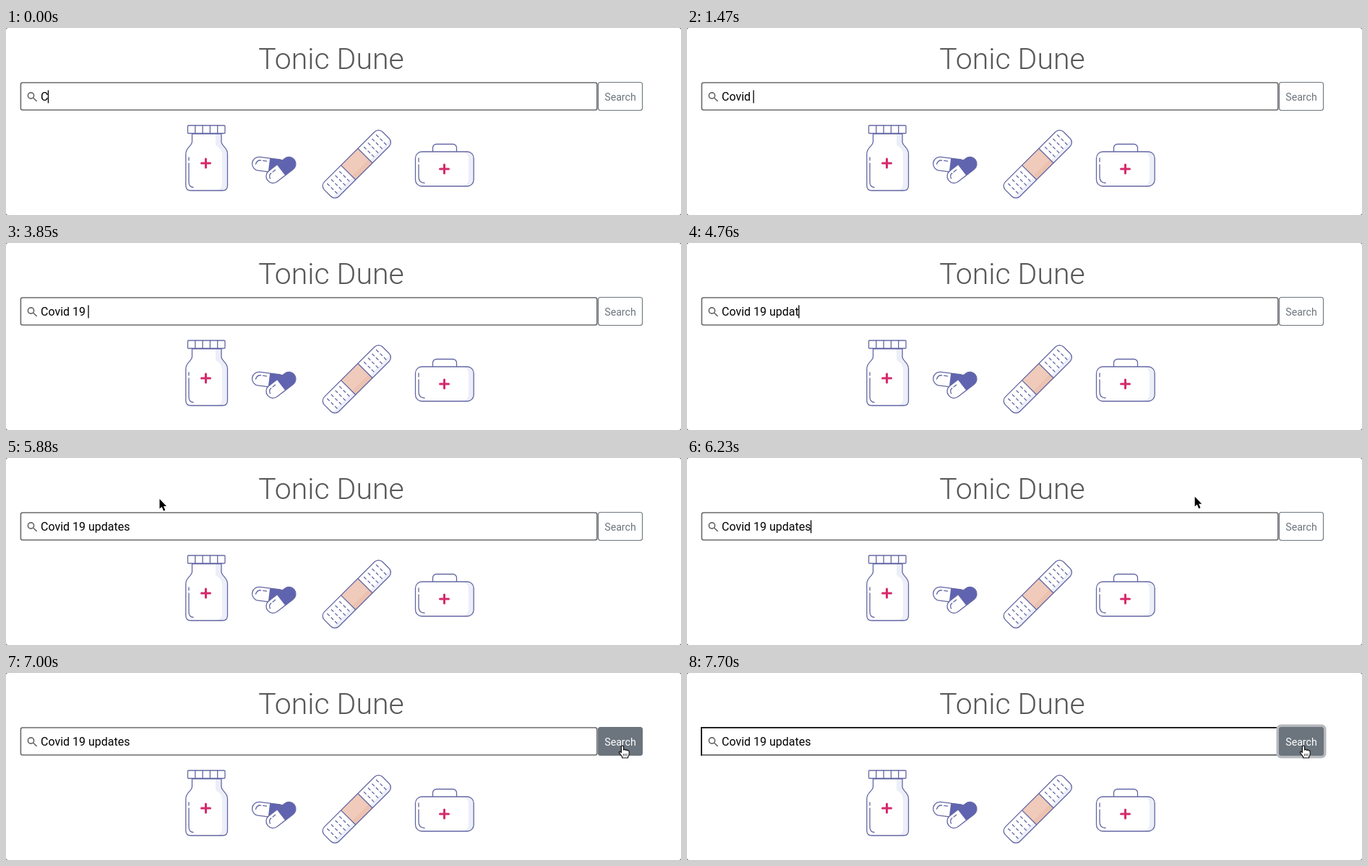
Animation of 934 by 260 pixels, one loop 8820 ms. Source, as an HTML page with a canvas:

```html
<!DOCTYPE html>
<html lang="en">
<head>
<meta charset="utf-8">
<title>Health search</title>
<style>
  html, body { margin: 0; width: 100%; height: 100%; overflow: hidden; background: #fff; }
  canvas { display: block; width: 934px; height: 260px; }
</style>
</head>
<body>
<canvas id="stage"></canvas>
<script>
const W = 934, H = 260, LOOP = 8820, STEP = 70;
const INK = '#6467a4', BLUE = '#6064b0', SHADE = '#eceef8', PINK = '#d62a6c';
const GREY = [108, 117, 125], WHITE = [255, 255, 255];
const QUERY = 'Covid 19 updates';
const KEY_TIMES = [0, 140, 280, 840, 980, 1470, 1850, 2520, 2800, 3990, 4270, 4410, 4620, 4760, 4900, 5180];
const BLINK = 525, HOVER = 6390, CLICK = 7190, FADE = 150;
// time, x, y of the pointer tip
const PATH = [[5740, 96, 95], [5880, 212, 57], [6090, 470, 24], [6300, 800, 72], [6440, 853, 95], [6580, 853, 101]];

const canvas = document.getElementById('stage');
const ctx = canvas.getContext('2d');
const dpr = window.devicePixelRatio || 1;
canvas.width = W * dpr;
canvas.height = H * dpr;

const clamp = v => Math.max(0, Math.min(1, v));
const mix = (a, b, p) => `rgb(${a.map((v, i) => Math.round(v + (b[i] - v) * p))})`;

// CSS "ease": cubic-bezier(.25, .1, .25, 1)
function ease(x) {
  if (x <= 0 || x >= 1) return clamp(x);
  let lo = 0, hi = 1;
  for (let i = 0; i < 20; i++) {
    const s = (lo + hi) / 2, r = 1 - s;
    if (.75 * r * r * s + .75 * r * s * s + s ** 3 < x) lo = s; else hi = s;
  }
  const r = 1 - lo;
  return .3 * r * r * lo + 3 * r * lo * lo + lo ** 3;
}

function pointerAt(t) {
  const last = PATH.length - 1;
  if (t >= PATH[last][0]) return PATH[last].slice(1);
  const i = PATH.findIndex((p, k) => t < PATH[k + 1][0]);
  const a = PATH[i], b = PATH[i + 1], span = b[0] - a[0], u = (t - a[0]) / span;
  const slope = (k, axis) => {
    const p = PATH[Math.max(0, k - 1)], q = PATH[Math.min(last, k + 1)];
    return k === last ? 0 : (q[axis] - p[axis]) / (q[0] - p[0]) * span;
  };
  return [1, 2].map(axis =>
    a[axis] * (2 * u ** 3 - 3 * u * u + 1) + b[axis] * (3 * u * u - 2 * u ** 3) +
    slope(i, axis) * (u ** 3 - 2 * u * u + u) + slope(i + 1, axis) * (u ** 3 - u * u));
}

function paint(path, fill, stroke, width = 1.3) {
  if (fill) { ctx.fillStyle = fill; ctx.fill(path); }
  if (stroke) { ctx.strokeStyle = stroke; ctx.lineWidth = width; ctx.stroke(path); }
}

function box(x, y, w, h, r) {
  const p = new Path2D();
  p.roundRect(x, y, w, h, r);
  return p;
}

const line = (d, color = INK, width = 1.3) => paint(new Path2D(d), null, color, width);

function within(path, draw) {
  ctx.save();
  ctx.clip(path);
  draw();
  ctx.restore();
}

function turned(x, y, degrees, draw) {
  ctx.save();
  ctx.translate(x, y);
  ctx.rotate(degrees * Math.PI / 180);
  draw();
  ctx.restore();
}

function label(text, x, y, font, color, align = 'left') {
  ctx.font = `${font} Roboto, sans-serif`;
  ctx.textAlign = align;
  ctx.fillStyle = color;
  ctx.fillText(text, x, y);
}

const plus = (x, y) => line(`M${x - 6} ${y}h12M${x} ${y - 6}v12`, PINK, 3);

function bottle() {
  const body = new Path2D('M257.5 147V158C257.5 164 248.8 166 248.8 175V219Q248.8 226 255.8 226H299.5Q306.5 226 306.5 219V175C306.5 166 298 164 298 158V147Z');
  paint(body, '#fff');
  within(body, () => paint(new Path2D('M290 147V163Q299 168 299 176V216Q299 224 291 226H308V147Z'), SHADE));
  paint(body, null, INK);
  paint(box(251.5, 135.5, 51.5, 11, 1), '#fff', INK);
  line('M261.8 135.5v11M272.1 135.5v11M282.4 135.5v11M292.7 135.5v11');
  line('M253 180V184M253 188V214Q253 221 259 221.5');
  plus(276.5, 188);
}

function capsule(x, y, degrees, half, mark) {
  turned(x, y, degrees, () => {
    const shell = box(-half, -9.5, half * 2, 19, 9.5);
    paint(shell, '#fff');
    within(shell, () => paint(box(0, -10, half, 20, 0), BLUE));
    paint(shell, null, INK);
    line(mark);
  });
}

function pills() {
  capsule(364, 190.5, 7, 23.5, 'M-18.5 1Q-17.5 -5 -12 -5M-9 -5H-4');
  capsule(380.5, 197.5, -38, 23.5, 'M-19 0Q-18 -5 -13.5 -5M-10.5 -5H-6');
}

function bandage() {
  turned(485.3, 189.3, -45, () => {
    const strip = box(-57, -14.3, 114, 28.6, 8);
    paint(strip, '#fff');
    within(strip, () => {
      paint(box(-58, 9, 116, 6, 0), SHADE);
      paint(box(-16.5, -15, 33, 30, 0), '#f0cbbb');
      paint(box(-16.5, 7, 33, 8, 0), '#ecc2b0');
    });
    paint(strip, null, INK);
    line('M-16.5 -14.3v28.6M16.5 -14.3v28.6');
    ctx.setLineDash([4.8, 2.8]);
    for (const side of [-1, 1])
      for (let u = 24; u <= 48; u += 8) line(`M${side * u} -10v20`);
    ctx.setLineDash([]);
  });
}

function kit() {
  paint(box(590.5, 161.5, 33, 18, 5), '#fff', INK);
  const body = box(566.5, 172, 80.7, 48, 9);
  paint(body, '#fff');
  within(body, () => paint(new Path2D('M630 172Q640 173 640 182V210Q640 219 630 220H649V172Z'), SHADE));
  paint(body, null, INK);
  line('M571 181V186M571 190V207Q571 215 579 215.5');
  plus(606.5, 196);
}

function searchField(t) {
  if (t < CLICK) {
    paint(box(20.4, 76, 797.4, 38, 2.5), '#fff', '#6b6b6b', 1.6);
  } else {
    paint(box(19, 75, 799, 40, 0), '#fff');
    line('M19 114H818M817 75V115', '#767676', 2);
    line('M20 115V76H818', '#222', 2);
  }
  line('M38.6 94a4.1 4.1 0 1 1 -8.2 0a4.1 4.1 0 1 1 8.2 0M37.5 97L42.6 101.8', '#6a6a6a', 1.7);

  const typed = KEY_TIMES.filter(k => k <= t);
  const text = QUERY.slice(0, typed.length);
  label(text, 48, 101, '16px', '#000');
  const idle = t - typed[typed.length - 1];
  if (t < CLICK && Math.floor(idle / BLINK) % 2 === 0) {
    ctx.fillRect(47.4 + ctx.measureText(text).width, 86.5, 1.3, 18);
  }
}

function searchButton(t) {
  const hover = ease(clamp((t - HOVER) / FADE));
  const focus = ease(clamp((t - CLICK) / FADE));
  if (focus > 0) {
    const g = 3.5 * focus;
    const ring = box(819 - g, 75 - g, 62 + 2 * g, 40 + 2 * g, 3 + g);
    paint(ring, '#fff');
    paint(ring, `rgba(${GREY},${.5 * focus})`);
  }
  paint(box(819.5, 75.5, 61, 39, 3), mix(WHITE, GREY, hover), `rgb(${GREY})`, 1.1);
  label('Search', 850, 100.5, '14.2px', mix(GREY, WHITE, hover), 'center');
}

function pointer(t) {
  if (t < PATH[0][0]) return;
  const [x, y] = pointerAt(t);
  ctx.save();
  ctx.translate(x, y);
  ctx.lineJoin = 'round';
  if (t < PATH[0][0] + STEP) {
    line('M-3 -8Q0 -8 0 -6Q0 -8 3 -8M0 -6V6M-3 8Q0 8 0 6Q0 8 3 8', '#000', 1.1);
  } else if (x > 819 && y > 75) {
    paint(new Path2D('M-1.6 1.2Q0 -1 1.6 1.2V6Q3.5 4.5 4.6 6.4Q6.3 5.2 7.2 7Q9 6.2 9.2 8.4V11.5Q9 14 7.6 15.4V17H-.4V15.4Q-2.5 13 -4.6 9.6Q-4.8 7.4 -1.6 9.4Z'), '#fff', '#111', 1.2);
    line('M1.6 11.2v3.2M3.8 11.2v3.2M6 11.2v3.2', '#111', .8);
  } else {
    const arrow = new Path2D('M.5 0V13.6L3.6 10.8L6 16.4L8.3 15.4L6 10H10Z');
    paint(arrow, null, '#fff', 2.2);
    paint(arrow, '#000');
  }
  ctx.restore();
}

function draw(t) {
  ctx.setTransform(dpr, 0, 0, dpr, 0, 0);
  ctx.fillStyle = '#555';
  ctx.fillRect(0, 0, W, H);
  paint(box(0, 0, W, H, 3), '#fff');
  label('Tonic Dune', 450, 56.5, '350 41px', '#58585a', 'center');
  ctx.lineCap = 'round';
  bottle();
  pills();
  ctx.lineCap = 'butt';
  bandage();
  ctx.lineCap = 'round';
  kit();
  ctx.lineCap = 'butt';
  searchField(t);
  searchButton(t);
  pointer(t);
}

// The picture advances in even steps
function tick(now) {
  draw(Math.floor((now % LOOP) / STEP) * STEP);
  requestAnimationFrame(tick);
}
draw(0);
requestAnimationFrame(tick);
</script>
</body>
</html>
```
